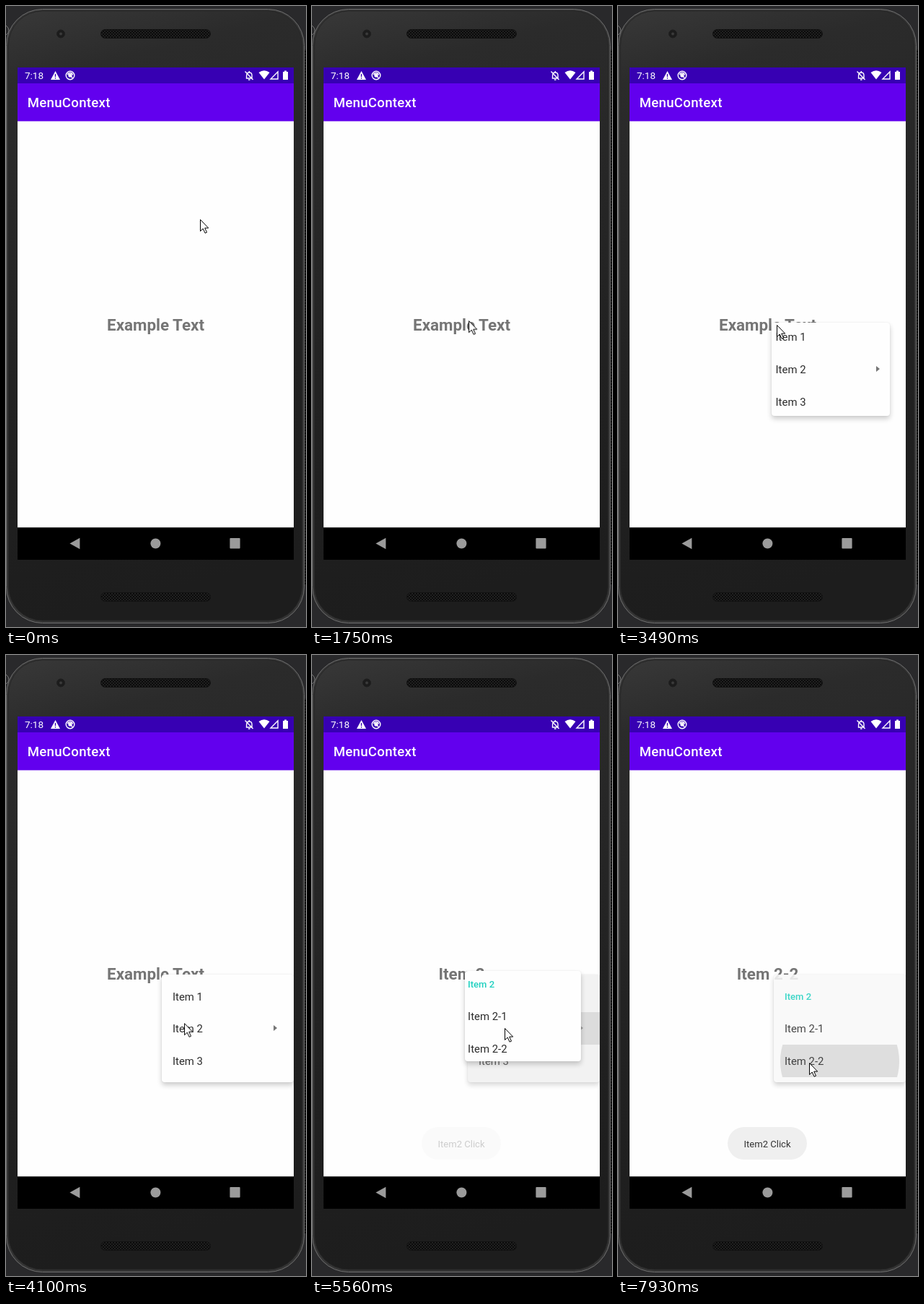
Write an HTML page that moves like this. It is 416 px wide and 859 px high and loops after 8 s.

```html
<!DOCTYPE html>
<html lang="en">
<head>
<meta charset="utf-8">
<title>Context menu</title>
<style>
@property --q { syntax: "<number>"; inherits: true; initial-value: 0; }

html, body { margin: 0; width: 100%; height: 100%; overflow: hidden; background: #29292b; }
body { position: relative; font-family: Roboto, sans-serif; }
svg { position: absolute; left: 0; top: 0; display: block; }

.screen { position: absolute; left: 16px; top: 159px; width: 383px; height: 562px; overflow: hidden; }
.anim, .menu, .ripple::before { animation: 8s linear infinite both; }
.step { animation-timing-function: step-end; }

.label { position: absolute; left: 0; width: 383px; top: 267px; line-height: 30px; text-align: center;
  font-weight: 700; font-size: 22.4px; color: #757575; }
.first { animation-name: first; }
.second { animation-name: second; }
.third { animation-name: third; }
@keyframes first { 0% { opacity: 1 } 66.2%, 100% { opacity: 0 } }
@keyframes second { 0% { opacity: 0 } 66.2% { opacity: 1 } 98.2%, 100% { opacity: 0 } }
@keyframes third { 0% { opacity: 0 } 98.2%, 100% { opacity: 1 } }

/* --q is the part of the reveal still to go: it shifts and clips the popup */
.menu { position: absolute; overflow: hidden; border-radius: 4px; background: #fefefe;
  left: calc(200px - 20px * var(--q)); top: calc(283px - 25px * var(--q));
  width: calc(183px - 110px * var(--q)); height: calc(149px - 120px * var(--q));
  box-shadow: 0 4px 7px rgba(0,0,0,.2), 0 0 2px rgba(0,0,0,.1); }
.list { position: absolute; width: 183px; height: 149px;
  left: calc(-55px * var(--q)); top: calc(-60px * var(--q)); }
.row { position: relative; top: 7.5px; height: 44.8px; line-height: 46.4px; padding-left: 15px;
  overflow: hidden; font-size: 14.9px; color: #2b2b2b; white-space: pre; }
.head { line-height: 45.2px; font-size: 13.05px; font-weight: 500; color: #1fd0c0; }
.arrow::after { content: ""; position: absolute; left: 154.5px; top: 17.8px;
  border: solid transparent; border-width: 4.7px 0 4.7px 5px; border-left-color: #757575; }
.ripple::before { content: ""; position: absolute; left: -8.5px; top: -77.6px; width: 200px; height: 200px;
  border-radius: 50%; background: rgba(0,0,0,.125); }

.main { animation-name: main; }
.sub { animation-name: sub; }
.main .ripple::before { animation-name: press-main; }
.sub .ripple::before { animation-name: press-sub; }
@keyframes main {
  0%, 41.8% { --q: .5; opacity: 0; background: #fefefe }
  42.7% { --q: .35; opacity: .8 }
  43.6% { --q: .17; opacity: 1 }
  44.5% { --q: .07 }
  46.2% { --q: 0 }
  66.5% { opacity: 1; background: #fefefe }
  69.5% { opacity: .75; background: #eee }
  71.6%, 100% { --q: 0; opacity: 0; background: #eee }
}
@keyframes sub {
  0%, 67.4% { --q: .5; opacity: 0 }
  68.6% { --q: .35; opacity: .8 }
  69.5% { --q: .2; opacity: 1 }
  70.4% { --q: .11 }
  71.3% { --q: .05 }
  73% { --q: 0 }
  98.2% { opacity: 1; background: #fefefe }
  99.1%, 100% { --q: 0; opacity: .87; background: #f8f8f8 }
}
@keyframes press-main {
  0%, 64.4% { opacity: 0; transform: translate(-40px, 0) scale(.15) }
  64.5% { opacity: 1; transform: translate(-40px, 0) scale(.15) }
  67% { opacity: 1; transform: scale(.83) }
  68%, 100% { opacity: 1; transform: scale(1) }
}
@keyframes press-sub {
  0%, 96.5% { opacity: 0; transform: translate(-42px, 0) scale(.15) }
  96.6% { opacity: 1; transform: translate(-42px, 0) scale(.15) }
  99.1%, 100% { opacity: 1; transform: translate(-.5px, 0) scale(.825) }
}

.toast { position: absolute; left: 136px; top: 494px; width: 110px; height: 45px; border-radius: 22.5px;
  background: #efefef; color: #333; font-size: 13.05px; line-height: 47px; text-align: center; animation-name: toast; }
@keyframes toast {
  0%, 67.7% { opacity: 0 }
  69.5% { opacity: .24 }
  71.3% { opacity: .68 }
  73% { opacity: .94 }
  74.7%, 100% { opacity: 1 }
}

.cursor { animation-name: move; }
@keyframes move {
  0%, 8.2% { transform: translate(269px, 295px); animation-timing-function: ease-in-out }
  18.5% { transform: translate(217px, 432px) }
  19.3%, 21.7% { transform: translate(217px, 433px) }
  21.8% { transform: translate(217px, 435px) }
  25%, 48.6% { transform: translate(220px, 441px) }
  49.5% { transform: translate(227px, 459px) }
  51.25% { transform: translate(247px, 509px) }
  54% { transform: translate(260px, 546px) }
  57% { transform: translate(268px, 561px) }
  60% { transform: translate(269px, 544px) }
  64.3%, 75.8% { transform: translate(267px, 516px) }
  78% { transform: translate(269px, 537px) }
  81.7%, 100% { transform: translate(265px, 564px) }
}
.click { animation-name: click; }
@keyframes click {
  0%, 27%, 43.6%, 66.2%, 98.4%, 100% { opacity: 0 }
  25.2%, 35.2%, 64.5%, 96.6% { opacity: .72 }
}
</style>
</head>
<body>
<svg width="416" height="859" viewBox="0 0 416 859">
  <defs>
    <linearGradient id="shell" x1="0" y1="0" x2=".12" y2="1">
      <stop offset="0" stop-color="#383838"/>
      <stop offset=".12" stop-color="#2b2b2b"/>
      <stop offset=".6" stop-color="#222"/>
      <stop offset="1" stop-color="#1d1d1d"/>
    </linearGradient>
    <pattern id="mesh" width="4" height="4" patternUnits="userSpaceOnUse">
      <rect width="4" height="4" fill="#202020"/>
      <path d="M0 0h2v2h-2zM2 2h2v2h-2z" fill="#0b0b0b"/>
    </pattern>
  </defs>
  <path d="M0 27q4 3 4 7t-4 6" fill="none" stroke="#777"/>
  <rect x="410" y="60" width="6" height="740" fill="url(#mesh)"/>
  <rect x=".5" y="4.5" width="413" height="849" rx="50" fill="#353535" stroke="#6f6f6f"/>
  <rect x="3.5" y="7" width="407" height="843" rx="47" fill="url(#shell)" stroke="#262626"/>
  <g fill="url(#mesh)" stroke="#121212">
    <rect x="131.5" y="32.5" width="152" height="12" rx="6"/>
    <rect x="131.5" y="811.5" width="152" height="12" rx="6"/>
  </g>
  <circle cx="76" cy="38.5" r="5.5" fill="#1c1c1c" stroke="#202020"/>
  <circle cx="76" cy="38.5" r="2" fill="#3a3a3a"/>

  <rect x="16" y="85" width="383" height="681"/>
  <rect x="16" y="150" width="383" height="571.3" fill="#fefefe"/>
  <rect x="16" y="85" width="383" height="22.4" fill="#3700b3"/>
  <rect x="16" y="107" width="383" height="52.4" fill="#6200ee"/>

  <g fill="#fff">
    <text x="26" y="101.2" font-size="13.5">7:18</text>
    <text x="29.7" y="140.4" font-size="18.65" font-weight="500" letter-spacing=".28">MenuContext</text>
    <path d="M68.5 90l6.5 12h-13z"/>
    <path d="M68.5 94v4M68.5 99v1.5" stroke="#3700b3" stroke-width="1.4"/>
    <circle cx="89" cy="96" r="2.6"/>
    <path d="M350.5 92q7.5-5.5 15 0l-7.5 9.5z"/>
    <path d="M384 91h2v-1.5h3v1.5h2v11h-7z"/>
  </g>
  <g fill="none" stroke="#fff" stroke-width="1.4">
    <circle cx="89" cy="96" r="5.8"/>
    <path d="M85.5 95a3.6 3.6 0 0 1 7 .5M87 94.5l5.5 5"/>
    <path d="M333.5 100h7.5v-4q0-4-3.7-4t-3.7 4zM337.3 90v2M336 102h2.5M331.5 90.5l11 11.5"/>
    <path d="M377 91v10h-10z"/>
  </g>
  <g fill="#9b9b9b">
    <path d="M88.4 743.5l14-7.7v15.4z"/>
    <circle cx="207.4" cy="743.5" r="7"/>
    <rect x="310.4" y="736" width="14.2" height="14.5" rx="1"/>
  </g>
</svg>

<div class="screen">
  <div class="label anim step first">Example Text</div>
  <div class="label anim step second">Item 2</div>
  <div class="label anim step third">Item 2-2</div>
  <div class="menu main"><div class="list">
    <div class="row">Item 1</div>
    <div class="row arrow ripple">Item 2</div>
    <div class="row">Item 3</div>
  </div></div>
  <div class="menu sub"><div class="list">
    <div class="row head">Item 2</div>
    <div class="row">Item 2-1</div>
    <div class="row ripple">Item 2-2</div>
  </div></div>
  <div class="toast anim">Item2 Click</div>
</div>

<svg width="416" height="859" viewBox="0 0 416 859">
  <g class="cursor anim">
    <circle class="click anim step" r="12" fill="#fff035"/>
    <path d="M.5 .5v16l3.7-3.5 2.9 6.2 2.4-1.1-2.8-6h5z" fill="#fff" stroke="#000"/>
  </g>
</svg>
</body>
</html>
```
